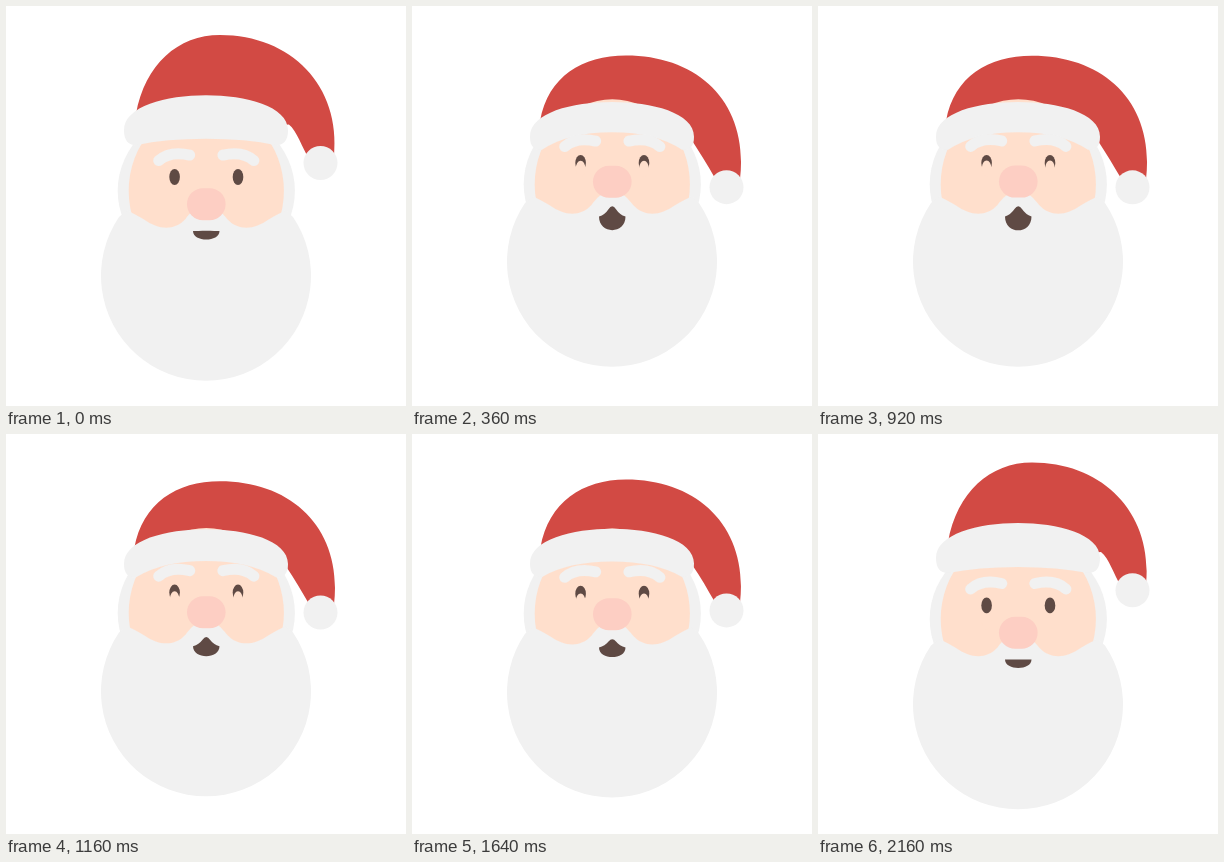
Animation of 400x400 px, one loop 3.08 s. Source, as an HTML page:

```html
<!DOCTYPE html>
<html lang="en">
<head>
<meta charset="utf-8">
<title>Laughing Santa</title>
<style>
  html, body { margin: 0; height: 100%; overflow: hidden; background: #fff; }
  svg { display: block; width: 100vw; height: 100vh; }
</style>
</head>
<body>
<svg id="stage" viewBox="0 0 400 400"></svg>
<script>
const LOOP = 3080, STEP = 40, MID = 200.3;
const RED = '#d24a44', FUR = '#f1f1f1', SKIN = '#ffdfcc', NOSE = '#fdcec3', DARK = '#5f4a44';
const stage = document.getElementById('stage');

// [time, lift]: 0 is the resting pose, 1 the full laugh
const keys = [[-50, 0], [420, 1], [600, .8], [850, 1.04], [1040, .8], [1400, 1.02], [2140, 0], [LOOP, 0]];

function liftAt(t) {
  const i = keys.findIndex(k => t < k[0]);
  const [t0, a] = keys[i - 1], [t1, b] = keys[i];
  const u = (t - t0) / (t1 - t0);
  return a + (b - a) * (1 - Math.cos(Math.PI * u)) / 2;
}

const path = (d, fill) => `<path d="${d}" fill="${fill}"/>`;
const oval = (x, y, rx, ry, fill) => `<ellipse cx="${x}" cy="${y}" rx="${rx}" ry="${ry}" fill="${fill}"/>`;
const shift = (dy, body) => `<g transform="translate(0 ${dy})">${body}</g>`;
const bothSides = body => `${body}<g transform="translate(${2 * MID} 0) scale(-1 1)">${body}</g>`;

function hat(p) {
  const top = 28.4 + 22 * p;
  return path(`M${130 - 2 * p} ${108 + 7 * p}
    C${139 - 3 * p} ${58 + 13 * p} ${172 - 2 * p} ${top} 214 ${top}
    C${285 + 2 * p} ${top} ${335 + 2 * p} ${79 + 19 * p} 328 ${150 + 24 * p}
    L303 ${152 + 21 * p}
    C296 ${141 + 20 * p} ${291 - 3 * p} ${124 + 24 * p} ${283 - 4 * p} ${118 + 16 * p}
    L200 125Z`, RED) + oval(314.5, 156.2 + 26 * p, 17, 17, FUR);
}

function brim(p) {
  const end = 124 + 7 * p, top = 89 + 7.3 * p, low = 139 + 5 * p, arch = 133 - 7 * p;
  return path(`M118 ${end}
    C118 ${end - 24} 160 ${top} 200 ${top}
    S282 ${end - 24} 282 ${end}
    C282 ${end + 10} 278 ${low} 270 ${low}
    Q${240 + 4 * p} ${arch} 200 ${arch}
    Q${160 - 4 * p} ${arch} 130 ${low}
    C122 ${low} 118 ${end + 10} 118 ${end}Z`, FUR);
}

function eyesAndBrows(p) {
  const brow = `<path d="M152.7 155Q164 145 183.7 149.5" fill="none" stroke="${FUR}" stroke-width="11" stroke-linecap="round"/>`;
  return bothSides(
    oval(168.6, 171.4 - 15 * p, 5.3, 8, DARK) +
    oval(168.6, 187.6 - 26 * p, 4.8, 8, SKIN) +
    shift(-15 * p, brow));
}

const beard = path(`M113 211.4 A105 105 0 1 0 287 211.4
  L279.6 205 Q272.6 208 262.6 214
  C248.6 224 232.6 226 221.1 213.5 C216 207 210 200 ${MID} 200
  S184 207 179.5 213.5 C168 226 152 224 138 214
  Q128 208 121 205Z`, FUR);

function mouth(p) {
  const side = 225.5 - 15.5 * p, peak = 225.5 - 26.2 * p;
  const depth = 8.5 + 1.5 * p + 33 * Math.max(0, p - .85);
  const at = k => side + (peak - side) * k;
  const low = side + depth * 4 / 3;
  return path(`M187 ${side}
    Q193 ${at(.2)} 196.5 ${at(.72)}
    Q${MID} ${at(1.28)} 204 ${at(.72)}
    Q207.5 ${at(.2)} 213.5 ${side}
    C213.5 ${low} 187 ${low} 187 ${side}Z`, DARK);
}

function draw(now) {
  const t = Math.floor(now % LOOP / STEP) * STEP;
  const p = liftAt(t);
  stage.innerHTML =
    hat(p) +
    shift(-7 * p, oval(MID, 185, 88.6, 82, FUR) + oval(MID, 185, 77.6, 85, SKIN)) +
    brim(p) +
    eyesAndBrows(p) +
    shift(-15 * p, beard) +
    mouth(p) +
    shift(-24 * p, `<rect x="181" y="182.8" width="38.6" height="32" rx="16" fill="${NOSE}"/>`);
}

const start = performance.now();
function tick() {
  draw(performance.now() - start);
  requestAnimationFrame(tick);
}
tick();
</script>
</body>
</html>
```
